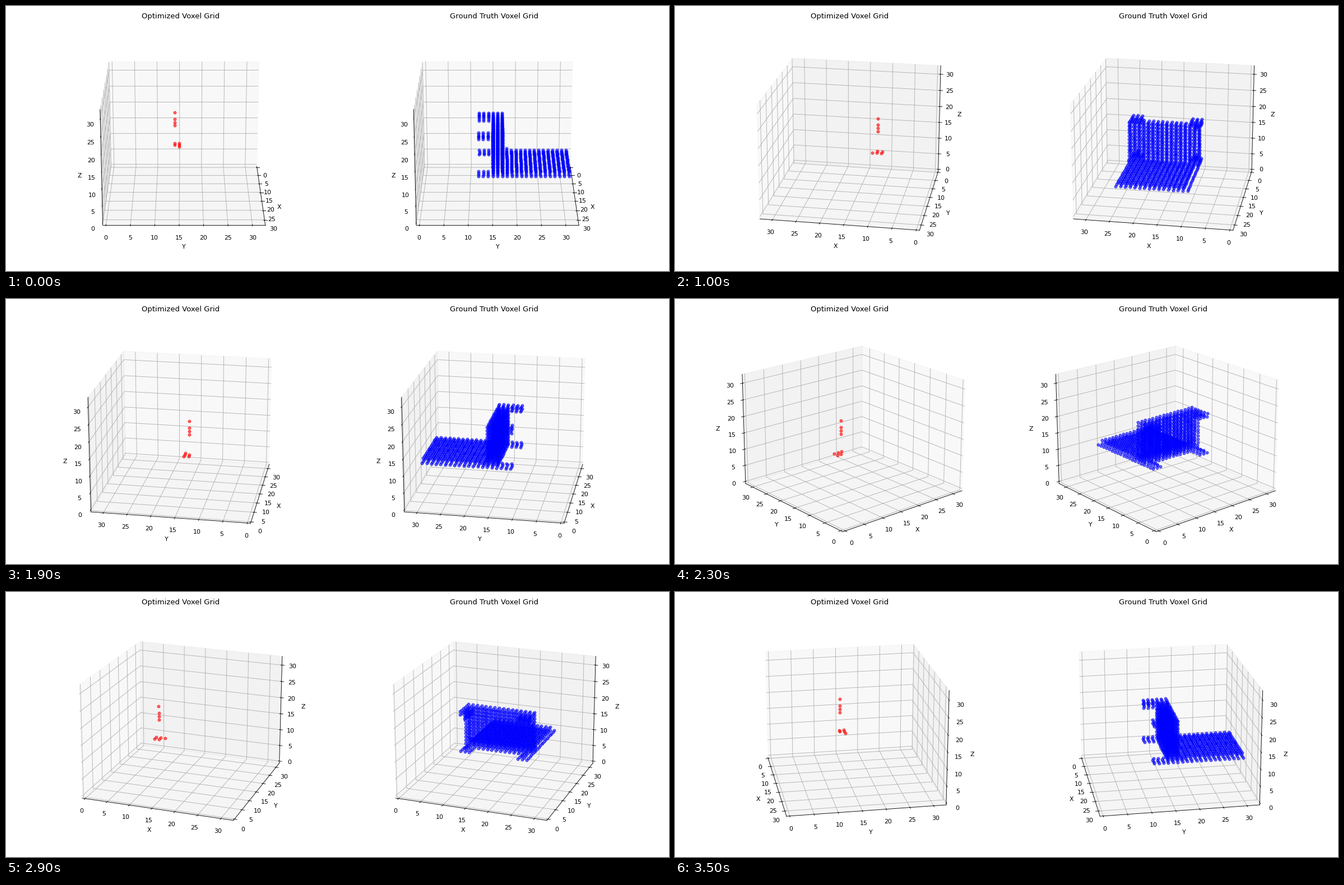
Write a matplotlib script that moves like this. It is 1183 px wide and 473 px high and loops after 3600 ms.

```python
from itertools import product

import matplotlib.pyplot as plt
import numpy as np
from matplotlib.animation import FuncAnimation

WIDTH, HEIGHT = 1183, 473
DPI = WIDTH / 15
FRAMES, INTERVAL = 36, 100
SIDE, BOTTOM = 432.5, 11.83  # square axes, in pixels


def block(xs, ys, zs):
    """All integer points of a box given by inclusive ranges."""
    spans = [range(lo, hi + 1) for lo, hi in (xs, ys, zs)]
    return set(product(*spans))


def sparse_grid():
    column = {(11, 14, z) for z in (18, 19, 20, 22)}
    return column | block((10, 11), (14, 14), (12, 12)) | block((10, 12), (15, 15), (12, 12))


def chair_grid():
    seat = block((9, 24), (15, 17), (9, 21))
    back = (block((9, 24), (18, 31), (9, 9))
            | block((10, 23), (19, 31), (10, 10))
            | block((9, 24), (18, 18), (10, 10)))
    legs = set()
    for x in (9, 22):
        legs |= block((x, x + 2), (12, 14), (20, 21))
        legs |= block((x, x + 2), (12, 14), (9, 9))
        legs |= block((x + 1, x + 1), (12, 14), (10, 10))
    legs |= block((10, 10), (12, 14), (19, 19))
    return seat | back | legs


def add_view(center_x, title, points, color):
    rect = ((center_x - SIDE / 2) / WIDTH, BOTTOM / HEIGHT, SIDE / WIDTH, SIDE / HEIGHT)
    ax = fig.add_axes(rect, projection="3d")
    ax.scatter(*np.array(sorted(points)).T, c=color, alpha=0.6, depthshade=False)
    margin = 32 / 48
    limits = (-margin, 32 + margin)
    ax.set(xlim=limits, ylim=limits, zlim=limits, title=title,
           xlabel="X", ylabel="Y", zlabel="Z")
    for axis in (ax.xaxis, ax.yaxis, ax.zaxis):
        axis.set_ticks(range(0, 31, 5))
    return ax


fig = plt.figure(figsize=((WIDTH + 1e-6) / DPI, (HEIGHT + 1e-6) / DPI), dpi=DPI)
views = [
    add_view(311.8, "Optimized Voxel Grid", sparse_grid(), "red"),
    add_view(871.2, "Ground Truth Voxel Grid", chair_grid(), "blue"),
]


def update(frame):
    for ax in views:
        ax.view_init(elev=20, azim=frame * 360 / FRAMES)
    return views


animation = FuncAnimation(fig, update, frames=FRAMES, interval=INTERVAL,
                          repeat=True, repeat_delay=0, blit=False)
plt.show()
```
